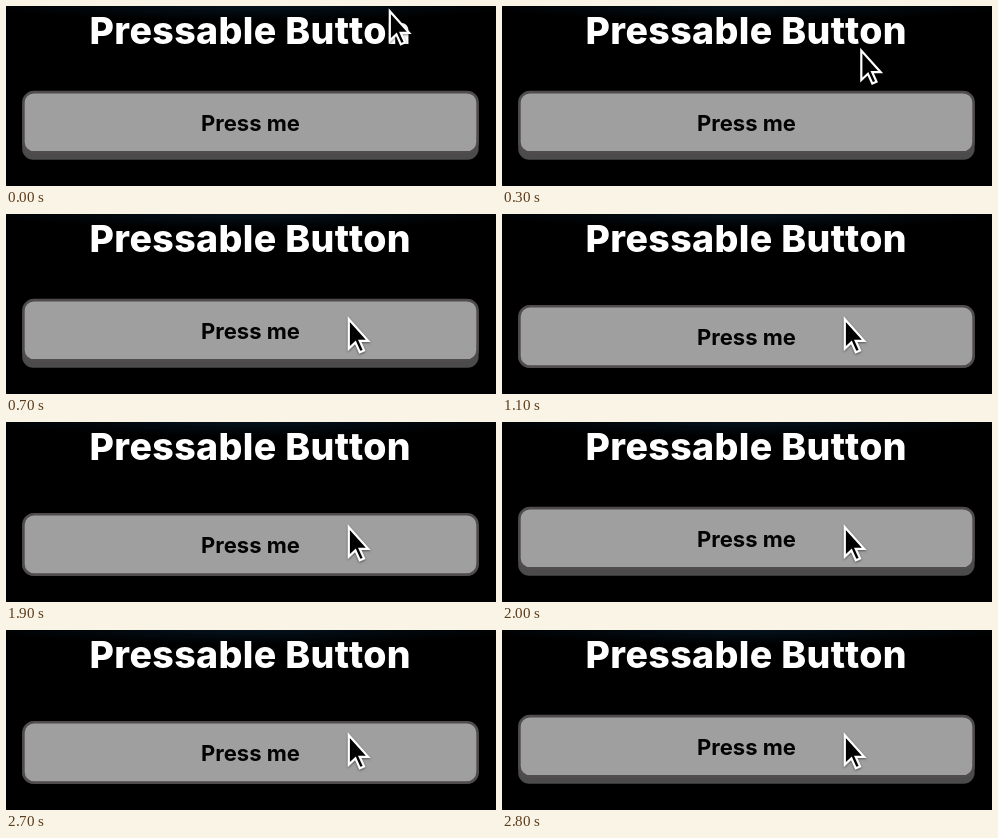
Animation, 490 px wide and 180 px high, one loop 3 s. Source, as an HTML page:

```html
<!DOCTYPE html>
<html lang="en">
<head>
<meta charset="utf-8">
<title>Pressable Button</title>
<style>
  html, body { margin: 0; height: 100%; overflow: hidden; background: #000; }
  svg { display: block; width: 490px; height: 180px; }
  text { font-family: Inter, "Liberation Sans", sans-serif; text-anchor: middle; }
  .title { font-size: 37.5px; font-weight: 800; letter-spacing: 0.01em; fill: #fff; }
  .label { font-size: 22px; font-weight: 700; fill: #030303; }
  #cursor { filter: drop-shadow(0 1.5px 1.2px #0007); }
</style>
</head>
<body>
<svg viewBox="0 0 490 180">
  <defs>
    <radialGradient id="glow">
      <stop stop-color="#04121d"/>
      <stop offset="1" stop-color="#000"/>
    </radialGradient>
  </defs>
  <ellipse cx="245" rx="270" ry="14" fill="url(#glow)"/>
  <text class="title" x="244.3" y="38.4">Pressable Button</text>

  <rect x="16.2" y="94" width="456.4" height="59.8" rx="11" fill="#4b4b4b"/>
  <g id="face">
    <rect x="17.4" y="86.1" width="454.2" height="60.3" rx="10.5" fill="#9f9f9f" stroke="#504c4e" stroke-width="2.6"/>
    <text class="label" x="244.5" y="124.5">Press me</text>
  </g>

  <path id="cursor" d="M1.8 2.8V32.2L8.4 26L12.8 35.8L17 34L12.7 24.4H21.2Z"
        fill="#000" stroke="#fff" stroke-width="2.2"/>
</svg>
<script>
  const LOOP = 3000, STEP = 100, ARRIVE = 700, PRESS_DEPTH = 6.2;
  const PRESSES = [1100, 1900, 2700];
  const face = document.getElementById("face");
  const cursor = document.getElementById("cursor");
  const move = (el, x, y) => el.setAttribute("transform", `translate(${x} ${y})`);

  // Eased descent that swings a little left before settling.
  function cursorAt(t) {
    const p = Math.min(t / ARRIVE, 1);
    const s = p * p * (3 - 2 * p);
    const swing = 290 * s ** 3 * (1 - s) ** 1.5;
    return [382 - 41 * s - swing, 2.4 + 100 * s];
  }

  const start = performance.now();
  function draw(now) {
    const elapsed = Math.max(0, now - start) % LOOP;
    const t = Math.floor(elapsed / STEP) * STEP;
    move(cursor, ...cursorAt(t));
    move(face, 0, PRESSES.includes(t) ? PRESS_DEPTH : 0);
    requestAnimationFrame(draw);
  }
  draw(start);
</script>
</body>
</html>
```
